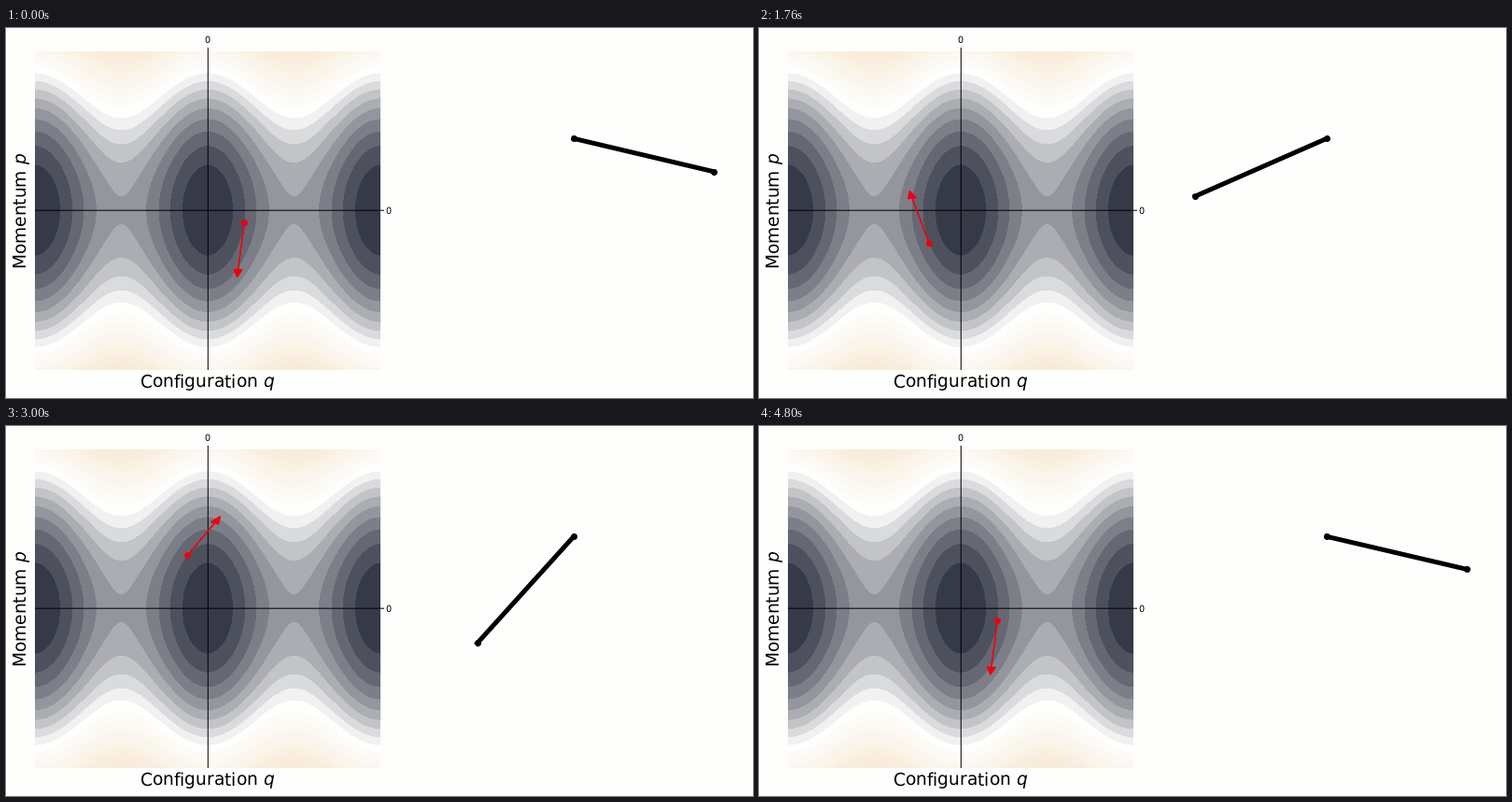
A matplotlib script for the animation above (4840 ms loop, 800x396 px).

```python
import numpy as np
import matplotlib.pyplot as plt
from matplotlib.animation import FuncAnimation
from matplotlib.colors import LinearSegmentedColormap

W, H, DPI = 800, 396, 100
FRAMES, INTERVAL = 121, 40
PX = 72 / DPI                      # one pixel in points

LEFT, RIGHT, TOP, BOTTOM = 31, 401, 24.5, 365.5
CX, CY = 216, 195
PIVOT, ROD = (608, 118.3), 154
Q_MAX = 1.37                       # swing amplitude in radians
PERIOD, TURN = 4.847, 0.172        # seconds; TURN is the time since the right turning point
SKIP = 30                          # the motion jumps one step ahead here
REACH = 0.95                       # arrow shaft per unit of velocity
PAPER, RED = "#fefefc", "#ee0010"

plt.rcParams["font.family"] = "DejaVu Sans"
plt.rcParams["mathtext.fontset"] = "dejavusans"
plt.rcParams["text.hinting"] = "none"


def swing(n=8000, span=7.6):
    """Integrate the pendulum from rest; return time, angle and momentum."""
    h = span / n
    q, p = Q_MAX, 0.0
    path = []
    for _ in range(n):
        path.append((q, p))
        p -= h / 2 * np.sin(q)
        q += h * p
        p -= h / 2 * np.sin(q)
    q, p = np.array(path).T
    return np.arange(n) * h, q, p


TIME, ANGLE, MOMENTUM = swing()
# the angle first crosses zero after a quarter of the period
CYCLE = 4 * TIME[np.argmax(ANGLE < 0)]


def state(i):
    t = (i + (i >= SKIP)) * INTERVAL / 1000 + TURN
    tau = (t / PERIOD % 1) * CYCLE
    return np.interp(tau, TIME, ANGLE), np.interp(tau, TIME, MOMENTUM)


fig = plt.figure(figsize=(W / DPI, H / DPI), dpi=DPI, facecolor=PAPER)


def phase_axes(order):
    """Axes over the portrait, angle in units of pi."""
    ax = fig.add_axes([LEFT / W, 1 - BOTTOM / H, (RIGHT - LEFT) / W, (BOTTOM - TOP) / H])
    ax.set_xlim(-2, 2)
    ax.set_ylim(-np.pi, np.pi)
    ax.axis("off")
    ax.set_zorder(order)
    return ax


phase = phase_axes(0)
x, y = np.meshgrid(np.linspace(-2, 2, 401), np.linspace(-np.pi, np.pi, 361))
energy = y ** 2 / 2 - np.cos(np.pi * x)
levels = np.linspace(-1, np.pi ** 2 / 2 + 1, 18)
shades = LinearSegmentedColormap.from_list(
    "shades", [(0, "#363a48"), (8 / 16, "#f1f1f2"), (9 / 16, "#fefefd"), (1, "#f8ecd8")])
phase.contourf(x, y, energy, levels=levels, colors=shades(np.linspace(0, 1, 17)),
               extend="max")

# overlay in pixel coordinates
stage = fig.add_axes([0, 0, 1, 1])
stage.set_xlim(0, W)
stage.set_ylim(H, 0)
stage.axis("off")
stage.set_zorder(1)

for xs, ys in (([CX + 0.3] * 2, [21, 366]), ([LEFT, 405], [CY + 0.2] * 2)):
    stage.plot(xs, ys, color="black", lw=PX, solid_capstyle="butt", snap=False)
stage.text(CX - 0.3, 16, "0", fontsize=9.7 * PX, ha="center", va="baseline")
stage.text(406.6, 199, "0", fontsize=9.7 * PX, ha="left", va="baseline")
stage.text(CX, 385.3, "Configuration $q$", fontsize=18.7 * PX, ha="center", va="baseline")
stage.text(21.7, CY, "Momentum $p$", fontsize=18.7 * PX, ha="center", va="baseline",
           rotation=90, rotation_mode="anchor")

# the arrow lies above the zero lines
front = phase_axes(2)
arrow = front.arrow(0, 0, 1, 1, width=0.001, head_width=0.1, head_length=0.15,
                    color=RED, lw=1.2 * PX)
dot, = front.plot([], [], "o", color=RED, ms=7 * PX, mew=0)

rod, = stage.plot([], [], "o-", color="black", lw=5 * PX, ms=7 * PX, mew=0)


def draw(i):
    q, p = state(i)
    pos = q / np.pi, p
    arrow.set_data(x=pos[0], y=pos[1], dx=REACH * p / np.pi, dy=-REACH * np.sin(q))
    dot.set_data([pos[0]], [pos[1]])
    rod.set_data([PIVOT[0], PIVOT[0] + ROD * np.sin(q)],
                 [PIVOT[1], PIVOT[1] + ROD * np.cos(q)])
    return arrow, dot, rod


anim = FuncAnimation(fig, draw, frames=FRAMES, interval=INTERVAL, repeat=True,
                     repeat_delay=0, blit=False)
plt.show()
```
